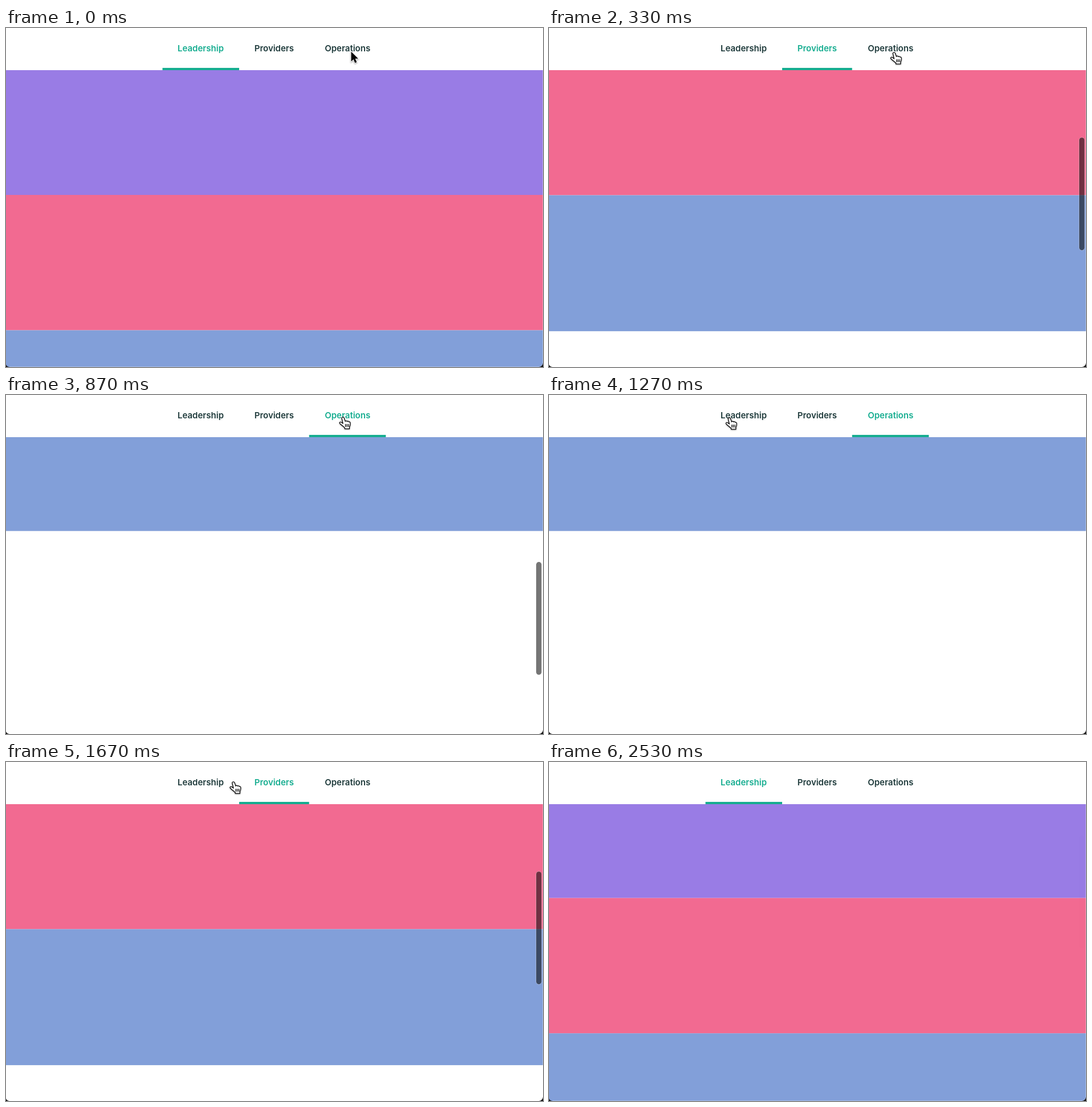
Animation, 942 px wide and 595 px high, one loop 2870 ms. Source, as an HTML page:

```html
<!DOCTYPE html>
<html lang="en">
<head>
<meta charset="utf-8">
<title>Scroll spy tabs</title>
<style>
  html, body { margin: 0; width: 100%; height: 100%; overflow: hidden; background: #fff; }
  svg { display: block; width: 942px; height: 595px; }
  text { font: 600 15px Inter, "Open Sans", sans-serif; text-anchor: middle; fill: #1e3a3b; }
  text.on { fill: #16ad90; }
  #cursor { filter: drop-shadow(0 1.5px 1.2px rgba(0, 0, 0, .4)); }
</style>
</head>
<body>
<svg viewBox="0 0 942 595">
  <g id="page">
    <rect y="-240" width="942" height="240" fill="#997ce5"/>
    <rect width="942" height="237.5" fill="#f26a91"/>
    <rect y="237.5" width="942" height="238.7" fill="#829fd9"/>
  </g>
  <rect width="942" height="74" fill="#fff"/>
  <g id="tabs">
    <text x="341.5" y="41">Leadership</text>
    <text x="470.4" y="41">Providers</text>
    <text x="599.2" y="41">Operations</text>
  </g>
  <rect id="bar" y="70" height="4" fill="#16ad90"/>
  <path d="M941.5 74V587Q941.5 594.5 934 594.5H6" fill="none" stroke="#fff" stroke-opacity=".3"/>
  <path d="M0 590.5Q1 594.3 6 595H0ZM942 588Q941 594 935 595H942Z" fill="#111"/>
  <rect id="thumb" x="930" width="9.4" height="198" rx="4.7" fill="#000" fill-opacity=".54"
        stroke="#fff" stroke-opacity=".45" stroke-width="1" paint-order="stroke"/>
  <g id="cursor">
    <path id="arrow" d="M0 0V17.2L4 13.5L6.7 19.8L9.8 18.5L7.1 12.3H12.3Z"
          fill="#000" stroke="#fff" stroke-width="2" paint-order="stroke"/>
    <g id="hand" stroke="#000" stroke-width="1.25" stroke-linejoin="round">
      <path fill="#fff" d="M-.8 1.6C-.8 -.6 2.6 -.9 3.4 1.2L5.4 7.2C6 5.7 8.4 5.9 8.8 7.4C9.6 6.3 11.6 6.7 11.9 8.2C13 7.5 14.2 8.3 14.2 10C14.4 13.2 13.8 15 12.8 17V20.2H4.6V18.5C2 16 -1.5 13.5 -4 11C-5.5 9 -3.5 7.6 -1.8 8.6L1.4 11Z"/>
      <path fill="none" d="M5.8 12V17M8.4 12V17M11 12V17"/>
    </g>
  </g>
</svg>
<script>
const $ = id => document.getElementById(id);
const LOOP = 2870, STEP = 200 / 3;
const EDGES = [274.5, 409, 531.7, 666.3];
const TOP = 293, BOTTOM = -237.5, HOME = 238.7, SECTION = 237.5;

const clamp = v => Math.max(0, Math.min(1, v));
const ease = v => (1 - Math.cos(Math.PI * clamp(v))) / 2;
const mix = (a, b, u) => a + (b - a) * u;
const scroll = (a, b, start, t) => mix(a, b, ease((t - start) / 344));

// Top edge of the second section
function offset(t) {
  return t < 1400 ? scroll(TOP, BOTTOM, 173, t) : scroll(BOTTOM, HOME, 1469, t);
}

function thumbOpacity(t) {
  if (t < 190) return 0;
  if (t < 1400) return clamp(1 - (t - 933) / 267);
  return t < 1500 ? 0 : clamp(1 - (t - 2267) / 267);
}

function pointer(t) {
  if (t < 60) return { x: 605.5, y: 41.5, arrow: true };
  if (t < 1480) {
    const u = clamp((t - 800) / 467);
    return { x: mix(604, 315, ease(u)), y: mix(43, 40, u) - 8 * Math.sin(Math.PI * u) };
  }
  const v = (t - 1467) / 200;
  const x = 315 + 83 * v ** 3;
  return { x, y: 40 - 5 * Math.min(v, 1), arrow: x > EDGES[3], gone: x > 942 };
}

function draw(time) {
  // Steps at 15 per second, their starts rounded to 10 ms
  const t = Math.floor((time % LOOP + 4) / STEP) * STEP;
  const y = offset(t);
  $("page").setAttribute("transform", `translate(0 ${y.toFixed(1)})`);

  const active = y > 74 ? 0 : y + SECTION > 74 ? 1 : 2;
  [...$("tabs").children].forEach((tab, i) => tab.classList.toggle("on", i === active));
  $("bar").setAttribute("x", EDGES[active]);
  $("bar").setAttribute("width", EDGES[active + 1] - EDGES[active]);

  $("thumb").setAttribute("y", 129.3 + (HOME - y) * .344);
  $("thumb").setAttribute("opacity", thumbOpacity(t));

  const p = pointer(t);
  $("cursor").setAttribute("transform", `translate(${p.x} ${p.y})`);
  $("cursor").style.display = p.gone ? "none" : "";
  $("arrow").style.display = p.arrow ? "" : "none";
  $("hand").style.display = p.arrow ? "none" : "";
}

const start = performance.now();
function tick() {
  draw(performance.now() - start);
  requestAnimationFrame(tick);
}
tick();
</script>
</body>
</html>
```
